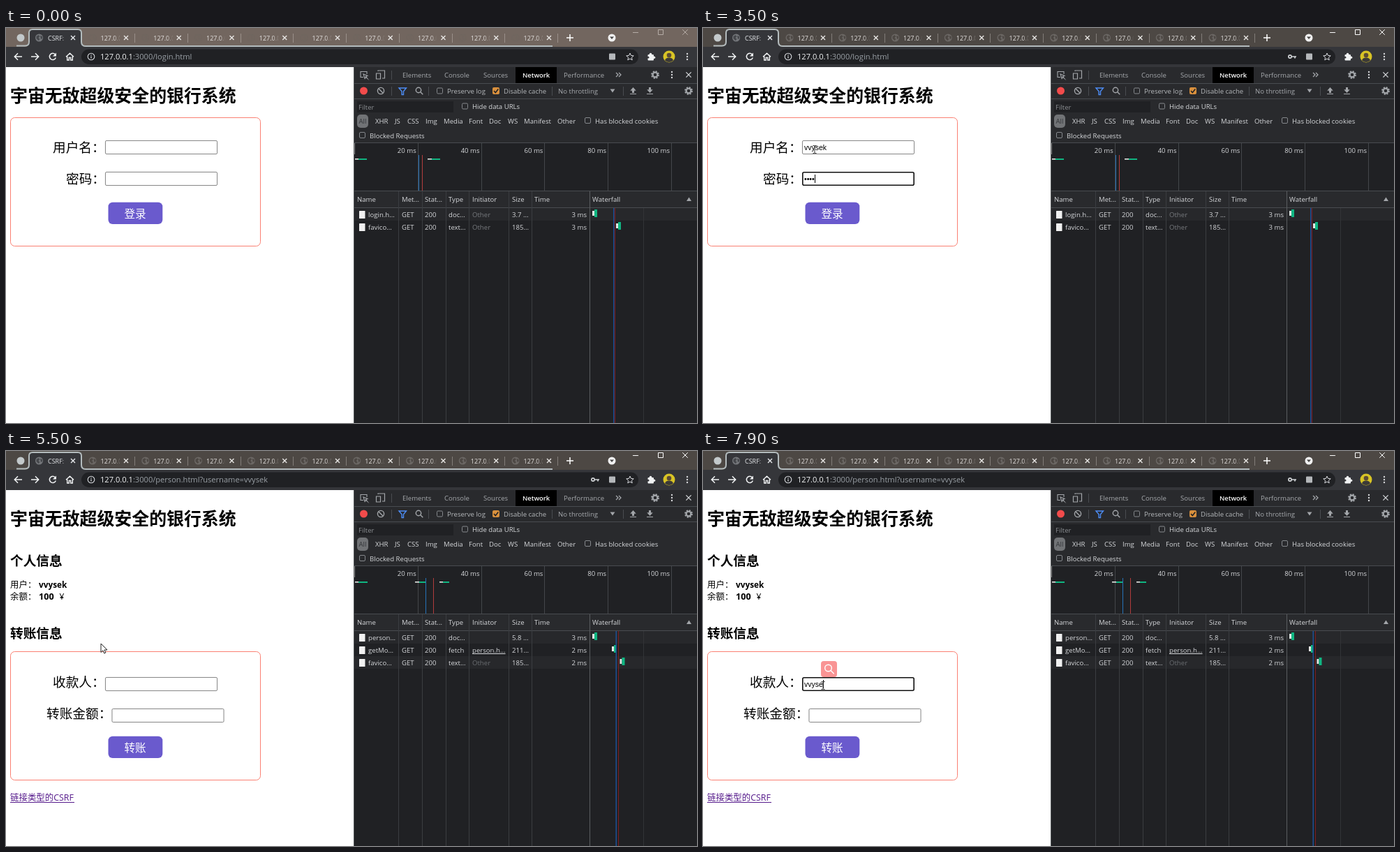
Write an HTML page with a canvas that moves like this. It is 990 by 566 pixels and loops after 8 s.

```html
<!DOCTYPE html>
<html lang="zh">
<head>
<meta charset="utf-8">
<title>CSRF</title>
<style>
  html, body { margin: 0; width: 100%; height: 100%; overflow: hidden; background: #fff; }
  canvas { display: block; }
</style>
</head>
<body>
<canvas id="stage" width="990" height="566"></canvas>
<script>
const g = document.getElementById('stage').getContext('2d');
const LOOP = 8000, STEP = 100;
const UI = '"Open Sans", "Noto Sans", sans-serif';
const CJK = '"Open Sans", "Noto Sans CJK SC", "Noto Sans CJK", sans-serif';
const FIELD = '"Liberation Sans", Arial, sans-serif';
const USER = 'vvysek';
const LIGHT = '#d5d7da', ICON = '#a3a6aa', RULE = '#494c50', PANEL = '#292a2d', DARK = '#202124';

// ---------- drawing helpers ----------
function rect(x, y, w, h, color, radius = 0) {
  g.fillStyle = color;
  g.beginPath();
  g.roundRect(x, y, w, h, radius);
  g.fill();
}
function frame(x, y, w, h, color, radius = 0, width = 1) {
  g.strokeStyle = color;
  g.lineWidth = width;
  g.beginPath();
  g.roundRect(x + width / 2, y + width / 2, w - width, h - width, radius);
  g.stroke();
}
function stroke(path, color, width = 1) {
  g.strokeStyle = color;
  g.lineWidth = width;
  g.stroke(new Path2D(path));
}
function fill(path, color) {
  g.fillStyle = color;
  g.fill(new Path2D(path));
}
function disc(x, y, r, color) {
  g.fillStyle = color;
  g.beginPath();
  g.arc(x, y, r, 0, 7);
  g.fill();
}
function ring(x, y, r, color, width = 1, dash = []) {
  g.strokeStyle = color;
  g.lineWidth = width;
  g.setLineDash(dash);
  g.beginPath();
  g.arc(x, y, r, 0, 2 * Math.PI);
  g.stroke();
  g.setLineDash([]);
}
// y is the middle of the capitals
function text(s, x, y, { size = 9.6, color = LIGHT, font = UI, weight = 400, align = 'left' } = {}) {
  g.font = `${weight} ${size}px ${font}`;
  g.fillStyle = color;
  g.textAlign = align;
  g.fillText(s, x, Math.round(y + size * 0.36));
  return g.measureText(s).width;
}
const vline = (x, y1, y2, color, w = 1) => rect(x, y1, w, y2 - y1, color);
const hline = (x1, x2, y, color) => rect(x1, y, x2 - x1, 1, color);
const cross = (x, y, r, color, w = 1.2) =>
  stroke(`M${x - r} ${y - r}l${2 * r} ${2 * r}m0 ${-2 * r}l${-2 * r} ${2 * r}`, color, w);
const dots = (x, y) => [-4, 0, 4].forEach(d => disc(x, y + d, 1.2, LIGHT));
function clipped(x, y, w, h, draw) {
  g.save();
  g.beginPath();
  g.rect(x, y, w, h);
  g.clip();
  draw();
  g.restore();
}
function gear(x, y) {
  ring(x, y, 3.4, ICON, 2.2);
  ring(x, y, 5, ICON, 1.8, [2.2, 1.73]);
}
function magnifier(x, y, r, color, w) {
  ring(x, y, r, color, w);
  stroke(`M${x + r * .7} ${y + r * .7}l${r} ${r}`, color, w);
}
function globe(x, y, color, land) {
  disc(x, y, 5.5, color);
  fill(`M${x - 4} ${y - 2}l3 -2 2 2 -2 2 2 2 -2 2 -3 -3zM${x + 1.5} ${y - 3}l3 1v3l-2 1z`, land);
}
function fading(s, x, w, color, background) {
  clipped(x - 1, 2, w + 1, 23, () => {
    text(s, x, 14.5, { size: 9, color });
    const fade = g.createLinearGradient(x + w - 7, 0, x + w, 0);
    fade.addColorStop(0, background + '00');
    fade.addColorStop(1, background);
    rect(x + w - 7, 3, 7, 22, fade);
  });
}

// ---------- browser ----------
function drawTabs(active) {
  const bar = active ? '#4d4844' : '#72665f';
  const glyph = active ? '#fff' : '#b5aca6';
  const favicon = active ? '#6b6764' : '#70665f';
  rect(0, 0, 990, 28, bar);
  disc(21, 14, 5.5, '#c3c9cb');
  rect(0, 27, 990, 29, '#35363a');
  const outline = 'M15 25.5H27Q33 25.5 33 20V7Q33 2 38 2H103Q108 2 108 7V20Q108 26 114 26';
  fill('M27 28Q33 26 33 20V7Q33 2 38 2H103Q108 2 108 7V20Q108 26 114 28z', '#35363a');
  stroke(outline + 'H783', '#b3bbbd', 2);
  globe(47.5, 14, '#74767a', '#45474b');
  fading('CSRF:', 60, 27, '#e8eaed', '#35363a');
  cross(96, 14, 3, '#e8eaed', 1.4);
  for (let i = 0; i < 9; i++) {
    const x = i * 75.75;
    globe(x + 124, 14, favicon, bar);
    fading('127.0.0', x + 135.5, 27, '#e3e0de', bar);
    cross(x + 172, 14, 3, '#e8e6e4', 1.4);
    vline(Math.round(x + 184), 8, 21, active ? '#827d79' : '#9a908a');
  }
  stroke('M803 14h10m-5 -5v10', '#fff', 1.5);
  disc(868, 14, 5.5, '#f1f1f1');
  fill('M865 12.5h6l-3 3.5z', '#444');
  hline(898, 906, 6, glyph);
  frame(934, 2, 8, 8, glyph);
  cross(973, 6, 3.8, glyph, 1);
}

function drawAddressBar(path, hasKey) {
  stroke('M23 41H12.5M17 36.3L12.3 41L17 45.7M36 41H46.5M42 36.3L46.7 41L42 45.7', '#f1f3f4', 1.5);
  stroke('M70.4 37.8A4.6 4.6 0 1 0 71.3 42.5', '#f1f3f4', 1.5);
  fill('M72 35.5v5h-5z', '#f1f3f4');
  stroke('M86 41.3L91.5 36.3L97 41.3M87.7 40.5V46H90.3V42.5H92.7V46H95.3V40.5', '#f1f3f4', 1.4);
  rect(108, 30.5, 798, 21.5, DARK, 10.75);
  ring(122, 41, 4.8, '#dadce0', 1.1);
  stroke('M122 40.5v3m0 -5.2v1.1', '#dadce0', 1.2);
  const host = text('127.0.0.1', 135, 41, { size: 11.1, color: '#f1f3f4' });
  text(':3000/' + path, 135 + host, 41, { size: 11.1, color: '#9aa0a6' });
  if (hasKey) {
    ring(841, 41, 2.1, '#d0d3d6', 1.7);
    stroke('M843.5 41H850M848 41v2.4', '#d0d3d6', 1.7);
  }
  rect(864, 36.5, 9, 9, '#b5b8bb', 1);
  stroke('M894 36l1.5 3.4 3.7 .4 -2.8 2.5 .8 3.6 -3.2 -1.9 -3.2 1.9 .8 -3.6 -2.8 -2.5 3.7 -.4z', '#dadce0', 1);
  rect(919.5, 38, 8.5, 8.5, '#f1f3f4', 1);
  disc(923.5, 37.5, 1.8, '#f1f3f4');
  disc(928.5, 42.2, 1.8, '#f1f3f4');
  disc(920, 42.2, 1.4, '#35363a');
  disc(950, 41, 8.5, '#d9c425');
  disc(950, 39, 3.3, '#5b4a35');
  fill('M944 46.5Q945 42.5 950 42.5T956 46.5Q950 51.5 944 46.5z', '#3c3a38');
  dots(976, 41);
}

// ---------- developer tools ----------
function checkbox(x, y, checked) {
  if (!checked) return frame(x, y - 4.5, 9, 9, '#85888c', 1.5);
  rect(x, y - 5, 10, 10, '#d9903d', 2);
  stroke(`M${x + 2} ${y}l2.3 2.5 4 -5`, DARK, 1.5);
}

function drawToolbars() {
  rect(499, 56, 491, 510, DARK);
  rect(499, 56, 491, 109, PANEL);
  vline(498, 56, 566, '#55585b');
  [79, 101, 164].forEach(y => hline(499, 990, y, RULE));

  stroke('M512 70.5H508V62.5H517V66M512 66l6 2.4 -2.6 1 2 2.6 -2 -1.6 -1.3 2z', ICON, 1.1);
  stroke('M533 62V61H542.5V72H539M530.5 65H536.5V73H530.5z', ICON, 1.2);
  vline(552, 61, 74, RULE);
  rect(730, 56, 59, 23, '#000');
  [['Elements', 568], ['Console', 628], ['Sources', 684], ['Performance', 799]]
    .forEach(([s, x]) => text(s, x, 68, { color: '#a6a9ad' }));
  text('Network', 740, 68, { color: '#fff', weight: 600, size: 9.4 });
  stroke('M874 64l3 3 -3 3m4 -6l3 3 -3 3', ICON, 1.3);
  gear(930, 67);
  dots(954, 67);
  cross(978, 67, 3.6, LIGHT, 1.3);

  disc(512.5, 90, 5.5, '#f24b4b');
  ring(537, 90, 4.6, ICON, 1.4);
  stroke('M533.8 86.8l6.4 6.4', ICON, 1.4);
  vline(552, 84, 97, RULE);
  stroke('M563 86h10.5l-4 4.8v4.7h-2.4v-4.7z', '#4d8df6', 1.4);
  magnifier(591, 89, 3.7, ICON, 1.4);
  vline(605, 84, 97, RULE);
  checkbox(617, 90);
  text('Preserve log', 632, 90.5, { color: '#b5b8bb' });
  checkbox(697, 90, true);
  text('Disable cache', 713, 90.5, { color: '#b5b8bb' });
  vline(782, 84, 97, RULE);
  text('No throttling', 791, 90.5, { color: '#a6a9ad' });
  fill('M865.5 87.5h7l-3.5 5z', ICON);
  vline(884, 84, 97, RULE);
  fill('M898.5 85l4.2 4.7h-2.7v3.3h-3v-3.3h-2.7zM922.5 93l4.2 -4.7h-2.7v-3.3h-3v3.3h-2.7z', ICON);
  hline(894, 903, 94, ICON);
  hline(918, 927, 94, ICON);
  gear(978, 90);

  rect(503, 105, 138, 16, DARK);
  text('Filter', 505, 113.5, { color: '#8b8e92' });
  checkbox(653, 112);
  text('Hide data URLs', 668, 113);
  rect(503, 124, 16, 19, '#717376', 5);
  text('All', 505.5, 134, { color: '#34363a' });
  [['XHR', 529], ['JS', 557], ['CSS', 575], ['Img', 601], ['Media', 627], ['Font', 663], ['Doc', 692],
    ['WS', 719], ['Manifest', 742], ['Other', 790], ['Has blocked cookies', 844]]
    .forEach(([s, x]) => text(s, x, 134));
  checkbox(829, 132.5);
  checkbox(506, 153.5);
  text('Blocked Requests', 521, 154.5);
}

function timingBar(x, y, white, green, height) {
  rect(x, y - height / 2 + (height > 4 ? 2 : 0), white, Math.max(1.6, height - 4), '#e4e6e4');
  rect(x + white, y - height / 2, green, height, '#10b682');
}

function drawOverview(net) {
  clipped(499, 165, 491, 69, () => {
    for (let i = 1; i <= 6; i++) {
      const x = 499 + i * net.gap;
      vline(Math.round(x), 165, 234, '#43464a');
      text(i * net.unit + ' ms', x - 2, 175.5, { align: 'right' });
    }
    vline(499, 165, 181, '#888');
    net.overview.forEach(([x, white, green]) => timingBar(x, 188, white, green, 2));
    vline(net.marks[0], 182, 234, '#2672b8');
    vline(net.marks[1], 182, 234, '#b23c3c');
  });
}

function drawTable(net) {
  rect(499, 234, 491, 23, PANEL);
  hline(499, 990, 233, RULE);
  hline(499, 990, 257, RULE);
  [['Name', 503], ['Met...', 567], ['Stat...', 600], ['Type', 634], ['Initiator', 668], ['Size', 725],
    ['Time', 757], ['Waterfall', 840]].forEach(([s, x]) => text(s, x, 246));
  fill('M975 248h7l-3.5 -5.5z', ICON);
  net.rows.forEach(([name, type, initiator, size, time, barX], i) => {
    const y = 267.5 + 18 * i;
    if (i % 2 === 0) rect(499, y - 9.5, 491, 18, '#27282b');
    rect(506, y - 5.5, 8.5, 11, '#f1f1f1', .5);
    [[name, 519], ['GET', 567], ['200', 600], [type, 634], [size, 725]].forEach(([s, x]) => text(s, x, y));
    const linked = initiator.endsWith('...');
    const width = text(initiator, 668, y, { color: linked ? LIGHT : net.dim });
    if (linked) hline(668, 668 + width, Math.round(y + 4.5), LIGHT);
    text(time, 832, y, { align: 'right' });
    timingBar(barX, y - 2, 3, 4, 11);
  });
  [562, 596, 630, 663, 720, 753].forEach(x => vline(x, 234, 566, '#3b3d41'));
  vline(836, 234, 566, '#5a5d61');
  vline(913, 258, 566, '#323437');
  vline(net.lines[0], 258, 566, '#1d5096', 1.5);
  vline(net.lines[1], 258, 566, '#7f1c1e');
}

const loginNet = {
  gap: 90.8, unit: 20, marks: [591, 596], lines: [870, 872], dim: '#777a7e',
  overview: [[500, 5, 12], [604, 6, 12]],
  rows: [['login.h...', 'doc...', 'Other', '3.7 ...', '3 ms', 840],
         ['favico...', 'text...', 'Other', '185...', '3 ms', 874]],
};
const personNet = {
  gap: 90.8, unit: 20, marks: [601, 612], lines: [873.5, 877], dim: '#6a6d71',
  overview: [[500, 5, 13], [586, 6, 9], [621, 5, 9]],
  rows: [['person...', 'doc...', '', '5.8 ...', '3 ms', 840],
         ['getMo...', 'fetch', 'person.h...', '211...', '2 ms', 868],
         ['favico...', 'text...', 'Other', '185...', '2 ms', 879.5]],
};
const loadingNet = { ...personNet, gap: 83.6, unit: 2000 };

// ---------- page ----------
const page = (s, x, y, size, weight = 400, color = '#000') =>
  text(s, x, y, { size, weight, color, font: CJK });

function input(x, y, value, focused, caret) {
  if (focused) frame(x, y, 161, 20, '#101010', 2, 1.6);
  else frame(x, y, 161, 20, '#767676', 1.6, .9);
  const width = text(value, x + 3, y + 10, { size: 10.5, color: '#000', font: FIELD });
  if (focused && caret) vline(Math.round(x + 3 + width), y + 4, y + 16, '#000');
}
function button(label, y) {
  rect(146.5, y - .3, 77.8, 31.3, '#6a5acd', 6.2);
  page(label, 169.5, y + 16, 15.6, 400, '#fff');
}

function drawLogin(s) {
  frame(6, 128, 359, 185, '#fa8072', 6);
  page('用户名：', 67, 171, 18.67);
  input(142, 161, USER.slice(0, s.name), s.focus === 'name', s.caret);
  page('密码：', 86, 216, 18.67);
  input(142, 206, '•'.repeat(s.password), s.focus === 'password', true);
  button('登录', 250);
}

function drawPerson(s) {
  page('个人信息', 6, 157, 18.67, 700);
  page('用户：', 6, 192, 12.44);
  page(USER, 47, 192, 11.8, 700);
  page('余额：', 6, 208.5, 12.44);
  page('100', 47, 208.5, 12.6, 700);
  page('¥', 76.5, 208.5, 12);
  page('转账信息', 6, 261, 18.67, 700);
  frame(6, 287, 359, 185, '#fa8072', 6);
  page('收款人：', 67, 331, 18.67);
  input(142, 324, USER.slice(0, s.payee), s.focus === 'payee', s.caret);
  page('转账金额：', 58, 376, 18.67);
  input(151.5, 369, '', false);
  button('转账', 409);
  page('链接类型的CSRF', 6, 497, 12.44, 400, '#551a8b');
  hline(6, 98, 503, '#551a8b');
  if (s.bubble) {
    rect(169, 301, 23, 23, '#f99494', 4);
    magnifier(179.5, 311, 4.8, '#fff', 1.4);
  }
}

// ---------- pointer ----------
const pointerPath = [
  [200, 236, 66, 'arrow'], [400, 156, 152, 'arrow'], [500, 160, 174, 'beam'], [3700, 160, 174, 'beam'],
  [3800, 163, 177, 'beam'], [3900, 181, 186, 'arrow'], [4100, 178, 235, 'arrow'], [4300, 182, 210, 'arrow'],
  [4400, 180, 253, 'hand'], [4500, 180, 257, 'hand'], [5100, 180, 257, 'hand'], [5200, 176, 260, 'arrow'],
  [5400, 115, 249, 'arrow'], [5500, 136, 276, 'arrow'], [5700, 157, 350, 'arrow'], [5900, 179, 287, 'arrow'],
  [6000, 169, 322, 'arrow'], [6200, 169, 322, 'arrow'], [6300, 172, 336, 'beam'], [LOOP, 172, 336, 'beam'],
];
const shapes = {
  arrow() {
    const p = 'M0 0V12.5L2.9 9.8L4.8 14L6.8 13L5 9H9z';
    fill(p, '#fff');
    stroke(p, '#222', 1);
  },
  beam() {
    stroke('M-2.5 -5.5H-.7L0 -5L.7 -5.5H2.5M0 -5V5M-2.5 5.5H-.7L0 5L.7 5.5H2.5', '#333', 1);
  },
  hand() {
    const p = 'M-1.5 11V1.5Q0 -.8 1.5 1.5V7Q3 5.6 4 7.4Q5.5 6.4 6.3 8.2Q8 8 8 10V13Q7 15 6.5 18H-.5Q-2 15 -5 12Q-5.6 9.5 -3.5 9.5z';
    fill(p, '#fff');
    stroke(p + 'M1.5 7v3M4 7.6v2.6M6.3 8.4v2', '#222', 1);
  },
};
function drawPointer(t) {
  const i = pointerPath.findIndex(k => k[0] > t);
  if (i < 1) return;
  const [t0, x0, y0, kind] = pointerPath[i - 1], [t1, x1, y1] = pointerPath[i];
  const k = (t - t0) / (t1 - t0);
  g.save();
  g.translate(x0 + (x1 - x0) * k, y0 + (y1 - y0) * k);
  shapes[kind]();
  g.restore();
}

// ---------- timeline ----------
const nameKeys = [900, 1000, 1100, 1700, 1800, 2700];
const passwordKeys = [3200, 3300, 3300, 3500, 3600, 3700];
const payeeKeys = [6600, 6700, 6800, 7500, 7600];
const typed = (keys, t) => keys.filter(k => k <= t).length;

function stateAt(t) {
  const between = (a, b) => t >= a && t < b;
  const lastAction = Math.max(0, ...[500, 6300, ...nameKeys, ...payeeKeys].filter(k => k <= t));
  return {
    active: t >= 400,
    name: typed(nameKeys, t),
    password: typed(passwordKeys, t),
    payee: typed(payeeKeys, t),
    focus: between(500, 2900) ? 'name' : between(2900, 4100) ? 'password' : t >= 6300 ? 'payee' : '',
    caret: (t - lastAction) % 1000 < 500,
    bubble: t >= 6400,
  };
}

function draw(now) {
  const t = Math.floor(now % LOOP / STEP) * STEP;
  const s = stateAt(t), loggedIn = t >= 4800;
  const net = !loggedIn ? loginNet : t < 5200 ? loadingNet : personNet;
  rect(0, 0, 990, 566, '#fff');
  drawTabs(s.active);
  drawAddressBar(loggedIn ? 'person.html?username=' + USER : 'login.html', t >= 3200);
  page('宇宙无敌超级安全的银行系统', 6, 97, 24.9, 700);
  (loggedIn ? drawPerson : drawLogin)(s);
  drawToolbars();
  drawOverview(net);
  drawTable(net);
  drawPointer(t);
}

const start = performance.now();
function tick() {
  draw(performance.now() - start);
  requestAnimationFrame(tick);
}
tick();
</script>
</body>
</html>
```
